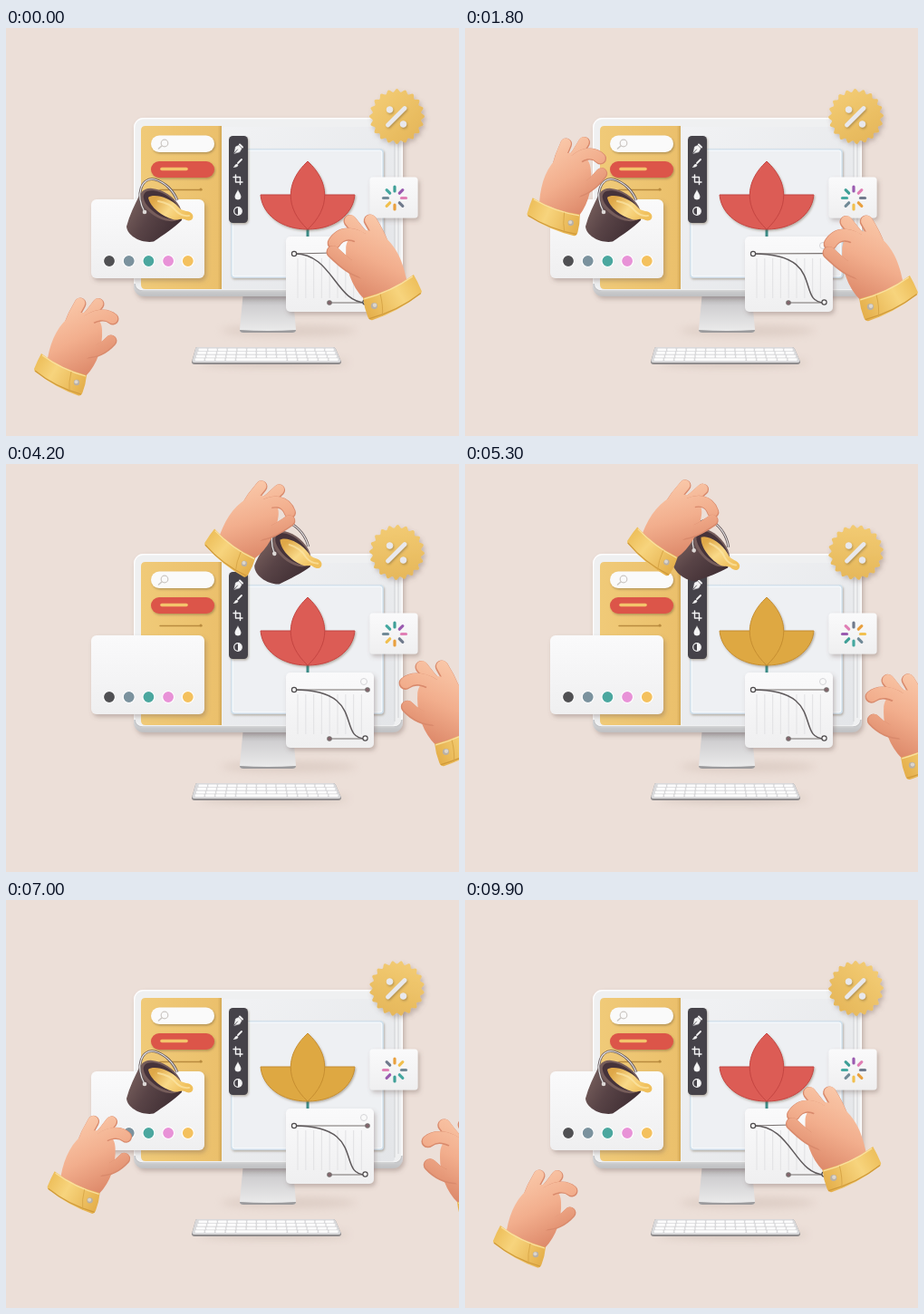
An HTML page that plays this animation: 500 by 450 pixels, repeating every 10000 ms.

```html
<!DOCTYPE html>
<html lang="en">
<head>
<meta charset="utf-8">
<title>Design desk</title>
<style>
html, body { margin: 0; width: 100%; height: 100%; overflow: hidden; background: #ecdfd8; }
svg { display: block; width: 500px; height: 450px; }
</style>
</head>
<body>
<svg viewBox="0 0 500 450" xmlns="http://www.w3.org/2000/svg">
<defs>
  <linearGradient id="body" x1="0" y1="0" x2="0" y2="1">
    <stop offset="0" stop-color="#f6f6f7"/><stop offset=".9" stop-color="#e6e7e9"/><stop offset="1" stop-color="#bfc0c2"/>
  </linearGradient>
  <linearGradient id="screen" x1="0" y1="0" x2="1" y2="1">
    <stop offset="0" stop-color="#f1f2f4"/><stop offset="1" stop-color="#e3e5e8"/>
  </linearGradient>
  <linearGradient id="side" x1="0" y1="0" x2="1" y2="0">
    <stop offset="0" stop-color="#f0ca78"/><stop offset=".95" stop-color="#ebc06c"/><stop offset="1" stop-color="#d3a855"/>
  </linearGradient>
  <linearGradient id="card" x1="0" y1="0" x2="0" y2="1">
    <stop offset="0" stop-color="#fafafb"/><stop offset="1" stop-color="#efeff0"/>
  </linearGradient>
  <linearGradient id="stand" x1="0" y1="0" x2="0" y2="1">
    <stop offset="0" stop-color="#a5a4a6"/><stop offset=".35" stop-color="#d0cfd1"/><stop offset="1" stop-color="#ececec"/>
  </linearGradient>
  <linearGradient id="gold" x1="0" y1="0" x2="1" y2="1">
    <stop offset="0" stop-color="#f5cf78"/><stop offset="1" stop-color="#e3b355"/>
  </linearGradient>
  <linearGradient id="cuff" gradientUnits="userSpaceOnUse" x1="32" y1="365" x2="86" y2="396">
    <stop offset="0" stop-color="#ecbc56"/><stop offset=".4" stop-color="#f7d47d"/><stop offset="1" stop-color="#e5b04c"/>
  </linearGradient>
  <linearGradient id="skin" gradientUnits="userSpaceOnUse" x1="58" y1="306" x2="96" y2="382">
    <stop offset="0" stop-color="#fac9aa"/><stop offset=".5" stop-color="#f2ae8d"/><stop offset="1" stop-color="#dc8768"/>
  </linearGradient>
  <linearGradient id="pail" gradientUnits="userSpaceOnUse" x1="136" y1="200" x2="180" y2="228">
    <stop offset="0" stop-color="#735b59"/><stop offset=".45" stop-color="#584346"/><stop offset="1" stop-color="#433136"/>
  </linearGradient>
  <linearGradient id="paint" gradientUnits="userSpaceOnUse" x1="165" y1="188" x2="195" y2="212">
    <stop offset="0" stop-color="#dfa848"/><stop offset=".5" stop-color="#f9d988"/><stop offset="1" stop-color="#f0c05c"/>
  </linearGradient>
  <filter id="soft" x="-20%" y="-20%" width="150%" height="150%">
    <feDropShadow dx="2" dy="3" stdDeviation="2.5" flood-color="#6d5a52" flood-opacity=".35"/>
  </filter>
  <filter id="lift" x="-20%" y="-30%" width="150%" height="180%">
    <feDropShadow dx="1" dy="1.5" stdDeviation="1" flood-color="#5d4a30" flood-opacity=".4"/>
  </filter>
  <filter id="blur" x="-30%" y="-150%" width="160%" height="400%"><feGaussianBlur stdDeviation="5"/></filter>
</defs>

<rect width="500" height="450" fill="#ecdfd8"/>

<!-- monitor -->
<ellipse cx="312" cy="334" rx="75" ry="6" fill="#b9a398" opacity=".3" filter="url(#blur)"/>
<path d="M262 290H316L320 332Q320 336 316 336H262Q258 336 258 332Z" fill="url(#stand)"/>
<path d="M258 333Q289 335 320 333Q320 336 316 336H262Q258 336 258 333Z" fill="#9b9a9c"/>
<rect x="141" y="99" width="297" height="197" rx="11" fill="url(#body)" filter="url(#soft)"/>
<rect x="141.7" y="99.7" width="295.6" height="190" rx="10" fill="#eff0f1" stroke="#fdfdfd" stroke-width="1.4"/>
<path d="M142 282Q143 290 151 290H428Q436 290 437 282" fill="none" stroke="#c6c7c9" stroke-width="1.6"/>
<rect x="239" y="109" width="190" height="179" rx="3" fill="url(#screen)"/>
<path d="M429 112V284M433 116V280" stroke="#d0d2d5"/>
<path d="M154 108H238V288H154Q149 288 149 283V113Q149 108 154 108Z" fill="url(#side)"/>
<rect x="249" y="134" width="167" height="141" rx="3" fill="#eef0f3" stroke="#cfe0ec" stroke-width="1.6" filter="url(#lift)"/>
<rect x="250.2" y="135.2" width="164.6" height="138.6" rx="2" fill="none" stroke="#f8fcff"/>

<!-- sidebar controls -->
<g filter="url(#lift)">
  <rect x="160" y="118.5" width="70" height="18.5" rx="9.2" fill="#fafafa"/>
  <rect x="160" y="147" width="70" height="18" rx="9" fill="#dc5448"/>
</g>
<circle cx="175" cy="127" r="3.8" fill="none" stroke="#cbc7c3" stroke-width="1.2"/>
<path d="M172 130L168.500 133" stroke="#cbc7c3" stroke-width="1.6" stroke-linecap="round"/>
<path d="M172 155.500H199" stroke="#f4c46c" stroke-width="3.6" stroke-linecap="round"/>
<path d="M170 178.500H216" stroke="#b98b3f" stroke-width="1.5" stroke-linecap="round"/>
<circle cx="215" cy="178" r="1.5" fill="#b98b3f"/>

<!-- tools -->
<rect x="246" y="119" width="21" height="96" rx="4.5" fill="#444348" filter="url(#lift)"/>
<g fill="#f4f4f5" stroke="#f4f4f5" stroke-linecap="round" stroke-linejoin="round">
  <path d="M252 138L253.500 131L257 129.500L260 133L258 136.500Z" stroke-width=".6"/>
  <path d="M258 128.500L261 131.500" stroke-width="2"/>
  <path d="M252 138L255.500 134" stroke="#444348" stroke-width=".8"/>
  <path d="M256 149L260 145" stroke-width="1.8"/>
  <path d="M251.500 153.500Q253.500 149.500 255.500 150.200Q257.500 153 251.500 153.500Z" stroke-width=".5"/>
  <path d="M253.500 162V170H261M251 164.500H258.500V172.500" fill="none" stroke-width="1.4"/>
  <path d="M256 179Q252.700 184 252.700 186A3.300 3.300 0 0 0 259.300 186Q259.300 184 256 179Z" stroke-width=".3"/>
  <circle cx="256" cy="202" r="4.300" fill="none" stroke-width="1.200"/>
  <path d="M256 198A4 4 0 0 1 256 206Z" stroke="none"/>
</g>

<!-- flower -->
<path d="M333 220V233" stroke="#3c8d88" stroke-width="3"/>
<g id="flower" filter="url(#lift)"></g>

<!-- keyboard -->
<ellipse cx="296" cy="369" rx="82" ry="4" fill="#a8948a" opacity=".4" filter="url(#blur)"/>
<path d="M211 352H361Q363 352 364 354L370 368Q370 371 367 371H208Q205 371 205 368L209 354Q209 352 211 352Z" fill="#8f8c8d"/>
<path d="M211 352H361Q363 352 364 354L369.500 367Q369.500 369 367 369H208Q205.500 369 205.500 367L209 354Q209 352 211 352Z" fill="#d9d9db"/>
<g id="keys" fill="#fcfcfc"></g>

<!-- badge -->
<g filter="url(#soft)"><path id="seal" fill="url(#gold)"/></g>
<g filter="url(#lift)" fill="#e8e8ec" stroke="#e8e8ec">
  <path d="M421.500 107L440 88.500" stroke-width="4.600" stroke-linecap="round"/>
  <circle cx="423.500" cy="90" r="3.300"/><circle cx="438.500" cy="106" r="3.300"/>
</g>

<!-- loader -->
<rect x="401.500" y="164.500" width="53" height="45" rx="3.500" fill="url(#card)" filter="url(#soft)"/>
<g id="loader" stroke-width="3.200" stroke-linecap="round"></g>

<!-- curve editor -->
<rect x="309" y="230" width="97" height="83" rx="5" fill="url(#card)" filter="url(#soft)"/>
<path id="grid" stroke="#e4e4e6" stroke-width="1.200"/>
<circle cx="395" cy="240" r="3.500" fill="#fafafa" stroke="#d5d5d8"/>
<g fill="none" stroke="#77706f" stroke-width="1.200">
  <path id="arm"/><path d="M357 303H397"/>
  <path id="curve" stroke="#5f5a5c" stroke-width="1.500"/>
  <circle cx="318" cy="249" r="2.600" fill="#f5f5f5" stroke="#4e4b4d"/>
  <circle cx="396.500" cy="302.500" r="2.600" fill="#f5f5f5" stroke="#4e4b4d"/>
  <circle cx="357" cy="303" r="2.200" fill="#85626b"/>
  <circle id="knob" r="2.200" fill="#85626b"/>
</g>

<!-- swatches -->
<rect x="94" y="189" width="125" height="87" rx="6" fill="url(#card)" filter="url(#soft)"/>
<g id="dots"></g>

<!-- paint bucket -->
<g id="bucket">
  <path d="M148 183C142 195 136 207 133 219C134 230 151 238 163 235.500C174 228 186 220 194 212C198 197 168 172 148 183Z" fill="url(#pail)"/>
  <ellipse cx="171" cy="195" rx="25.500" ry="14" transform="rotate(33 171 195)" fill="#765d5b"/>
  <ellipse cx="172" cy="195" rx="23" ry="11.500" transform="rotate(33 172 195)" fill="#46333a"/>
  <path d="M157 187C163 182 181 187 190 197C195 204 203 200 206 206C208 212 202 214 197 211C194 209 190 213 184 211C173 208 159 198 157 187Z" fill="url(#paint)"/>
  <path d="M168 191Q181 193 188 202Q194 208 202 207" fill="none" stroke="#fde7a8" stroke-width="2" stroke-linecap="round" opacity=".7"/>
  <path d="M153 203C142 183 150 164 164 167C176 170 185 180 189 190" fill="none" stroke="#5f5355" stroke-width="2.800"/>
  <path d="M153 203C142 183 150 164 164 167C176 170 185 180 189 190" fill="none" stroke="#e6e2e2" stroke-width="1.200"/>
  <circle cx="153" cy="203" r="2.300" fill="#ddd8d6"/>
</g>

<g id="left"></g>
<g id="right"></g>
</svg>
<script>
const $ = id => document.getElementById(id);
const LOOP = 10000, STEP = 100;

// rows: time, then the values at that time
const leftKeys = [
  [0, 0, 0, 0], [200, -2, -4, -1], [700, -12, -55, -6], [1100, 4, -115, -8], [1800, 34, -175.5, -6],
  [2100, 41.5, -169.5, 0], [2300, 41.5, -169.5, 0], [2800, 24, -276, 0], [3300, 50, -283, 3],
  [4200, 193, -281, 10], [4700, 198, -284, 18], [5000, 198, -284, 18], [5500, 105, -280, 5],
  [5800, 28, -272, 0], [6200, 41.5, -169.5, 0], [6400, 41.5, -169.5, 0], [7400, 0, 0, 0], [LOOP, 0, 0, 0]
];
const bucketKeys = [
  [0, 0, 0, 0], [2300, 0, 0, 0], [2800, -20, -104, 0], [3300, 6, -108, 3], [4200, 148, -102, 8],
  [4700, 153, -100, 30], [5000, 153, -100, 30], [5500, 60, -105, 4], [5800, -15, -100, 0],
  [6200, 0, 0, 0], [LOOP, 0, 0, 0]
];
const rightKeys = [
  [0, 0, 0], [1100, 35, 0], [1800, 41, 1], [2800, 42, -13], [3300, 60, 6], [4200, 79, 11],
  [5200, 86, 24], [6200, 98, 44], [7100, 104, 34], [8000, 102, 17], [8400, 75, 5], [8800, 36, 1], [LOOP, 0, 0]
];

const ramp = (t, a, b) => Math.min(1, Math.max(0, (t - a) / (b - a)));

// slope at a key; flat at turning points so holds stay still
function slope(keys, i, c) {
  if (i === 0 || i === keys.length - 1) return 0;
  const [p, q, r] = [keys[i - 1], keys[i], keys[i + 1]];
  const a = (q[c] - p[c]) / (q[0] - p[0]), b = (r[c] - q[c]) / (r[0] - q[0]);
  return a * b <= 0 ? 0 : 2 * a * b / (a + b);
}

function sample(keys, t) {
  let i = 0;
  while (i < keys.length - 2 && t >= keys[i + 1][0]) i++;
  const a = keys[i], b = keys[i + 1], d = b[0] - a[0], u = (t - a[0]) / d;
  return a.slice(1).map((v, j) => {
    const c = j + 1, w = 1 - u;
    return v * (1 + 2 * u) * w * w + b[c] * u * u * (3 - 2 * u)
      + d * u * w * (slope(keys, i, c) * w - slope(keys, i + 1, c) * u);
  });
}

const finger = (d, w, cls = '') =>
  `<path class="${cls}" d="${d}" stroke="#d98a6c" stroke-width="${w}"/>` +
  `<path class="${cls}" d="${d}" stroke="url(#skin)" stroke-width="${w - 1.6}" transform="translate(-.4 -.6)"/>`;

const handArt = `
  <g fill="none" stroke-linecap="round" stroke-linejoin="round">
    ${finger('M69 331Q74 317 82 304', 13)}
    ${finger('M84 326Q94 316 102 304.500', 13)}
    <path d="M46 364C50 343 58 326 74 316C90 310 106 318 106 333C107 351 101 371 88 384C71 382 56 374 46 364Z" fill="url(#skin)"/>
    ${finger('', 13, 'index')}
    ${finger('', 13, 'thumb')}
    <path d="M60 341Q64 326 78 320L90 322L97 332L95 354L82 366Q64 360 60 341Z" fill="url(#skin)" stroke="url(#skin)" stroke-width="8"/>
  </g>
  <path d="M39 359Q35 366 31 376Q31 379 35 381Q55 397 80 405.500Q83 406 84.500 402Q88 393 89 383Q61 376 39 359Z" fill="url(#cuff)"/>
  <path d="M32 378Q54 396 83 404" fill="none" stroke="#d09a3a" stroke-width="1.200"/>
  <path d="M40 361Q62 377 88 384" fill="none" stroke="#fae0a0" stroke-width="1.200"/>
  <path d="M72 379Q69 391 70 401" fill="none" stroke="#d8a648" stroke-width=".900"/>
  <circle cx="78" cy="391" r="3.200" fill="#b9b0a5"/><circle cx="77.500" cy="390.300" r="2" fill="#dcd6cd"/>`;

function pinch(hand, g) {
  const set = (cls, d) => hand.querySelectorAll('.' + cls).forEach(p => p.setAttribute('d', d));
  set('index', `M85 327C98 315 111 315 118 ${321 + 6 * g}`);
  set('thumb', `M85 358C98 ${359 - 3 * g} 108 ${354 - 7 * g} ${116 + 3 * g} ${345 - 9 * g}`);
}

function build() {
  $('left').innerHTML = $('right').innerHTML = handArt;

  $('flower').innerHTML =
    '<path d="M281 184H333V222C304 222 283 206 281 184Z"/><path d="M385 184H333V222C362 222 383 206 385 184Z"/>' +
    '<path d="M333 147C308 170 308 199 333 222C358 199 358 170 333 147Z"/>';

  const colours = ['#505053', '#7b929e', '#4ba79f', '#e892d7', '#f4c15e'];
  $('dots').innerHTML = colours.map((c, i) =>
    `<circle cx="${114 + i * 21.7}" cy="257" r="6.500" fill="${c}" stroke="#fff" stroke-width="1.200"/>`).join('');

  const rays = ['#3f9f97', '#9a5bb0', '#e07fb5', '#707a8c', '#e9a03f', '#f1c04f', '#718a97', '#45a8a0'];
  $('loader').innerHTML = rays.map((c, i) =>
    `<path d="M0-7.500V-12.500" stroke="${c}" transform="rotate(${i * 45})"/>`).join('');

  let keys = '';
  for (let r = 0; r < 4; r++) {
    const x = 212.5 - r * 1.3, pitch = (150.5 + r * 2.9) / 14, y = 353.5 + r * 3.6;
    for (let k = 0; k < 14; k++) {
      if (r === 3 && k > 4 && k < 9) continue;
      const w = r === 3 && k === 4 ? pitch * 5 : pitch;
      keys += `<rect x="${x + k * pitch}" y="${y}" width="${w - 1.2}" height="2.700" rx="1"/>`;
    }
  }
  $('keys').innerHTML = keys;

  let seal = '';
  for (let i = 0; i < 160; i++) {
    const a = i * Math.PI / 80, r = 28.7 + 1.8 * Math.cos(20 * a);
    seal += `${i ? 'L' : 'M'}${(r * Math.cos(a)).toFixed(2)} ${(r * Math.sin(a)).toFixed(2)}`;
  }
  $('seal').setAttribute('d', seal + 'Z');

  let grid = '';
  for (let x = 322; x < 396; x += 8.8) grid += `M${x} 254V298`;
  $('grid').setAttribute('d', grid);
}

const mix = (a, b, u) => `rgb(${a.map((v, i) => Math.round(v + (b[i] - v) * u))})`;

function draw(t) {
  const [lx, ly, lr] = sample(leftKeys, t);
  $('left').setAttribute('transform', `translate(${lx} ${ly}) rotate(${lr} 75 345)`);
  pinch($('left'), ramp(t, 1500, 2100) - ramp(t, 6300, 6700));

  const [bx, by, br] = sample(bucketKeys, t);
  $('bucket').setAttribute('transform', `translate(${bx} ${by}) rotate(${br} 166 168)`);

  const [rx, ry] = sample(rightKeys, t);
  $('right').setAttribute('transform', `translate(${493.4 + rx} ${ry - 115.8}) scale(-1.115 1.08)`);
  const free = ramp(t, 2800, 3100) - ramp(t, 8500, 8800);
  pinch($('right'), 1 - free);

  // the curve handle follows the right hand until let go
  let hx = 399, hy = 249;
  if (t < 3100 || t >= 8800) {
    const u = ramp(t, 2800, 3100) * (t < 3100);
    hx = (360 + Math.min(rx, 42) * .97) * (1 - u) + 399 * u;
    hy = (248 + Math.min(ry, 1) * .72) * (1 - u) + 249 * u;
  }
  $('arm').setAttribute('d', `M318 249L${hx} ${hy}`);
  $('curve').setAttribute('d', `M318 249C${hx} ${hy} 364 303 397 303`);
  $('knob').setAttribute('cx', hx);
  $('knob').setAttribute('cy', hy);

  const dyed = ramp(t, 4700, 5200) - ramp(t, 8900, 9300);
  $('flower').setAttribute('fill', mix([220, 91, 84], [222, 168, 66], dyed));
  $('flower').setAttribute('stroke', mix([196, 70, 66], [198, 142, 48], dyed));

  $('seal').setAttribute('transform', `translate(431.5 97.5) rotate(${90 * t / LOOP})`);
  // colours hop from spoke to spoke
  $('loader').setAttribute('transform', `translate(429 187.5) rotate(${45 * Math.floor(t * 40 / LOOP)})`);
}

build();
const start = performance.now();
function tick() {
  const t = (performance.now() - start) % LOOP;
  draw(Math.floor(t / STEP) * STEP);
  requestAnimationFrame(tick);
}
tick();
</script>
</body>
</html>
```
